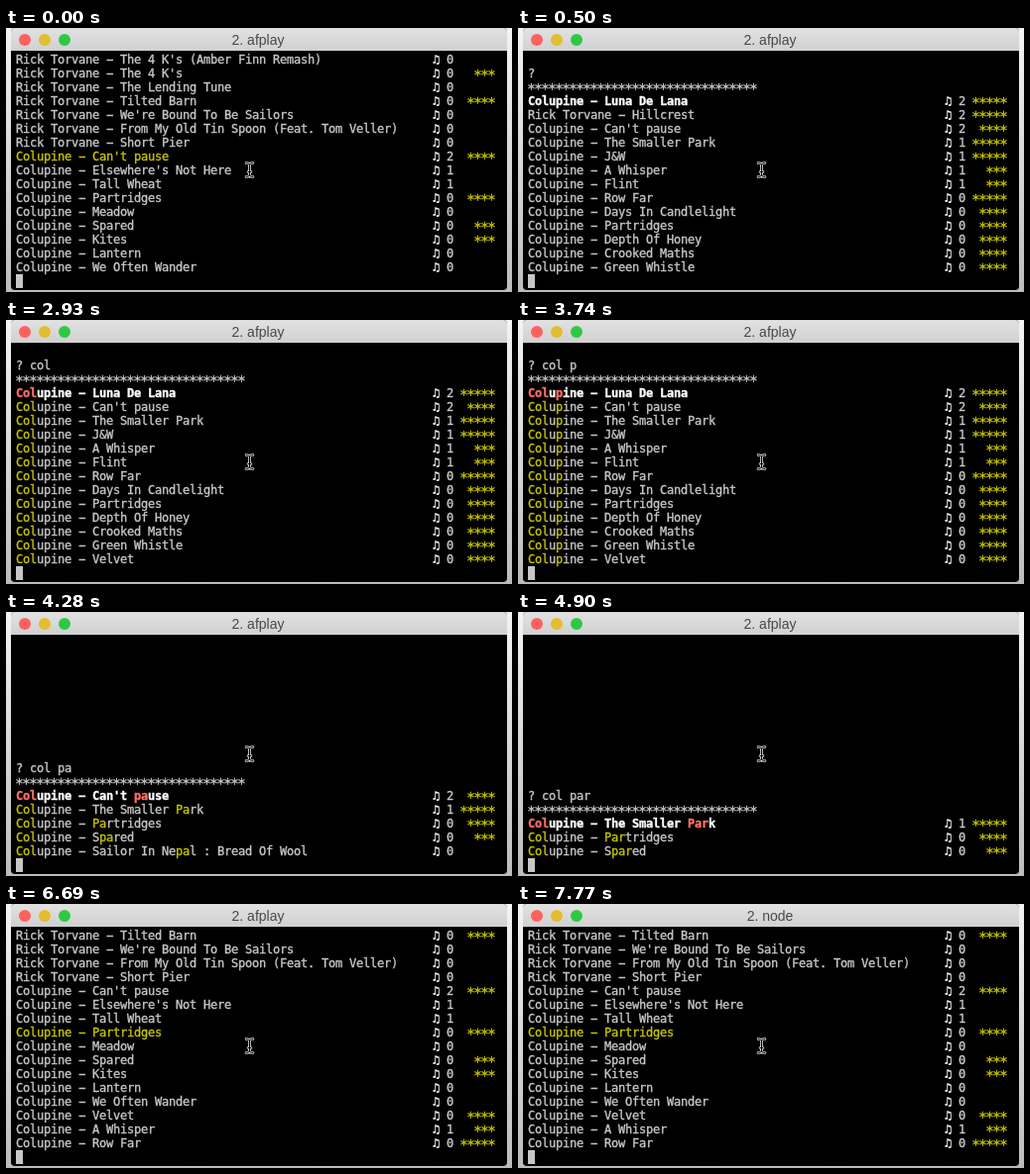
Write an HTML page with a canvas that moves like this. It is 510x267 px and loops after 8 s.

```html
<!DOCTYPE html>
<html lang="en">
<head>
<meta charset="utf-8">
<title>Terminal music player</title>
<style>
  html, body { margin: 0; height: 100%; overflow: hidden; }
  canvas { display: block; }
</style>
</head>
<body>
<canvas width="510" height="267"></canvas>
<script>
const ctx = document.querySelector('canvas').getContext('2d');
const LOOP = 8000, CELL = 7, LINE = 14, LEFT = 10, TOP = 25, ROWS = 16;
const TEXT = '#c7c7c7', YELLOW = '#c7c400', WHITE = '#fff', RED = '#ff6e67';
const MONO = '"DejaVu Sans Mono", monospace';

// Each track: title, play count, rating
const track = artist => ([title, plays = 0, stars = 0]) =>
  ({ name: `${artist} − ${title}`, plays, stars });

const library = [
  ...[
    ["The 4 K's (Amber Finn Remash)"],
    ["The 4 K's", 0, 3],
    ['The Lending Tune'],
    ['Tilted Barn', 0, 4],
    ["We're Bound To Be Sailors"],
    ['From My Old Tin Spoon (Feat. Tom Veller)'],
    ['Short Pier'],
  ].map(track('Rick Torvane')),
  ...[
    ["Can't pause", 2, 4],
    ["Elsewhere's Not Here", 1],
    ['Tall Wheat', 1],
    ['Partridges', 0, 4],
    ['Meadow'],
    ['Spared', 0, 3],
    ['Kites', 0, 3],
    ['Lantern'],
    ['We Often Wander'],
    ['Velvet', 0, 4],
    ['A Whisper', 1, 3],
    ['Row Far', 0, 5],
  ].map(track('Colupine')),
];

const ranked = [
  track('Colupine')(['Luna De Lana', 2, 5]),
  track('Rick Torvane')(['Hillcrest', 2, 5]),
  ...[
    ["Can't pause", 2, 4],
    ['The Smaller Park', 1, 5],
    ['J&W', 1, 5],
    ['A Whisper', 1, 3],
    ['Flint', 1, 3],
    ['Row Far', 0, 5],
    ['Days In Candlelight', 0, 4],
    ['Partridges', 0, 4],
    ['Depth Of Honey', 0, 4],
    ['Crooked Maths', 0, 4],
    ['Green Whistle', 0, 4],
    ['Velvet', 0, 4],
    ['Spared', 0, 3],
    ['Sailor In Nepal : Bread Of Wool'],
  ].map(track('Colupine')),
];

const scenes = [
  { at: 0, scroll: 0, selected: 7 },
  { at: 500, query: '', selected: 0 },
  { at: 2390, query: 'c', selected: 0 },
  { at: 2480, query: 'co', selected: 0 },
  { at: 2930, query: 'col', selected: 0 },
  { at: 3740, query: 'col p', selected: 0 },
  { at: 4280, query: 'col pa', selected: 0 },
  { at: 4900, query: 'col par', selected: 0 },
  { at: 5890, query: 'col par', selected: 1 },
  { at: 6690, scroll: 3, selected: 7 },
  { at: 7770, scroll: 3, selected: 7, title: '2. node' },
];

// Prints one character per cell; a hairline stroke adds the smoothed weight
function print(col, row, text, color = TEXT, { bold = false, size = 12, drop = 0 } = {}) {
  ctx.font = `${bold ? 'bold ' : ''}${size}px ${MONO}`;
  ctx.textAlign = 'center';
  ctx.lineWidth = 0.35;
  [...text].forEach((char, i) => {
    const x = LEFT + (col + i + 0.5) * CELL;
    const y = TOP + row * LINE + 11 + drop;
    ctx.fillStyle = ctx.strokeStyle = typeof color === 'function' ? color(i) : color;
    ctx.fillText(char, x, y);
    ctx.strokeText(char, x, y);
  });
}

function printStars(col, row, count, color) {
  print(col, row, '*'.repeat(count), color, { size: 14, drop: 2 });
}

function printTrack(row, { name, plays, stars }, color, bold) {
  print(0, row, name, color, { bold });
  print(60, row, '♫', WHITE);
  print(62, row, String(plays));
  printStars(69 - stars, row, stars, YELLOW);
}

function drawSearch({ query, selected }) {
  const terms = query.split(' ').filter(Boolean);
  const find = (name, term) => name.toLowerCase().indexOf(term);
  const hits = ranked
    .filter(({ name }) => terms.every(term => find(name, term) >= 0))
    .slice(0, ROWS - 3);
  const first = ROWS - hits.length;

  print(0, first - 2, '? ' + query);
  printStars(0, first - 1, 33, TEXT);
  hits.forEach((hit, i) => {
    const bold = i === selected;
    const spans = terms.map(term => [find(hit.name, term), term.length]);
    const color = n => spans.some(([start, size]) => n >= start && n < start + size)
      ? (bold ? RED : YELLOW)
      : (bold ? WHITE : TEXT);
    printTrack(first + i, hit, color, bold);
  });
}

function drawLibrary({ scroll, selected }) {
  library.slice(scroll, scroll + ROWS).forEach((item, i) =>
    printTrack(i, item, i === selected ? YELLOW : TEXT));
}

function verticalGradient(height, from, to) {
  const gradient = ctx.createLinearGradient(0, 0, 0, height);
  gradient.addColorStop(0, from);
  gradient.addColorStop(1, to);
  return gradient;
}

function drawWindow(title) {
  ctx.fillStyle = verticalGradient(267, '#f4f4f4', '#bcbcbc');
  ctx.fillRect(0, 0, 510, 267);
  ctx.fillStyle = '#000';
  ctx.beginPath();
  ctx.roundRect(5, 0, 500, 265, 4);
  ctx.fill();
  ctx.fillStyle = verticalGradient(23, '#e2e2e2', '#d0d0d0');
  ctx.beginPath();
  ctx.roundRect(5, 0, 500, 23, [4, 4, 0, 0]);
  ctx.fill();

  ['#fc615d', '#e3bd30', '#2fc845'].forEach((color, i) => {
    ctx.fillStyle = color;
    ctx.beginPath();
    ctx.arc(19 + i * 20, 12, 6, 0, 2 * Math.PI);
    ctx.fill();
  });

  ctx.font = '14px "Liberation Sans", sans-serif';
  ctx.textAlign = 'center';
  ctx.fillStyle = '#484848';
  ctx.fillText(title, 254, 17);
}

// Black I-beam with a light outline
const pointer = new Path2D(
  'M242 136.5q3.5 0 3.5 2q0-2 3.5-2M245.5 138v11' +
  'M242 150.5q3.5 0 3.5-2q0 2 3.5 2M244 145.5h3');

function drawPointer() {
  ctx.lineCap = 'round';
  for (const [color, width] of [['#e0e0e0', 2.6], ['#000', 1]]) {
    ctx.strokeStyle = color;
    ctx.lineWidth = width;
    ctx.stroke(pointer);
  }
}

function draw(now) {
  const time = now % LOOP;
  const scene = scenes.findLast(({ at }) => at <= time);
  drawWindow(scene.title ?? '2. afplay');
  if (scene.query === undefined) drawLibrary(scene);
  else drawSearch(scene);
  ctx.fillStyle = TEXT;
  ctx.fillRect(LEFT, TOP + ROWS * LINE, CELL, LINE);
  drawPointer();
  requestAnimationFrame(() => draw(performance.now()));
}
draw(0);
</script>
</body>
</html>
```
